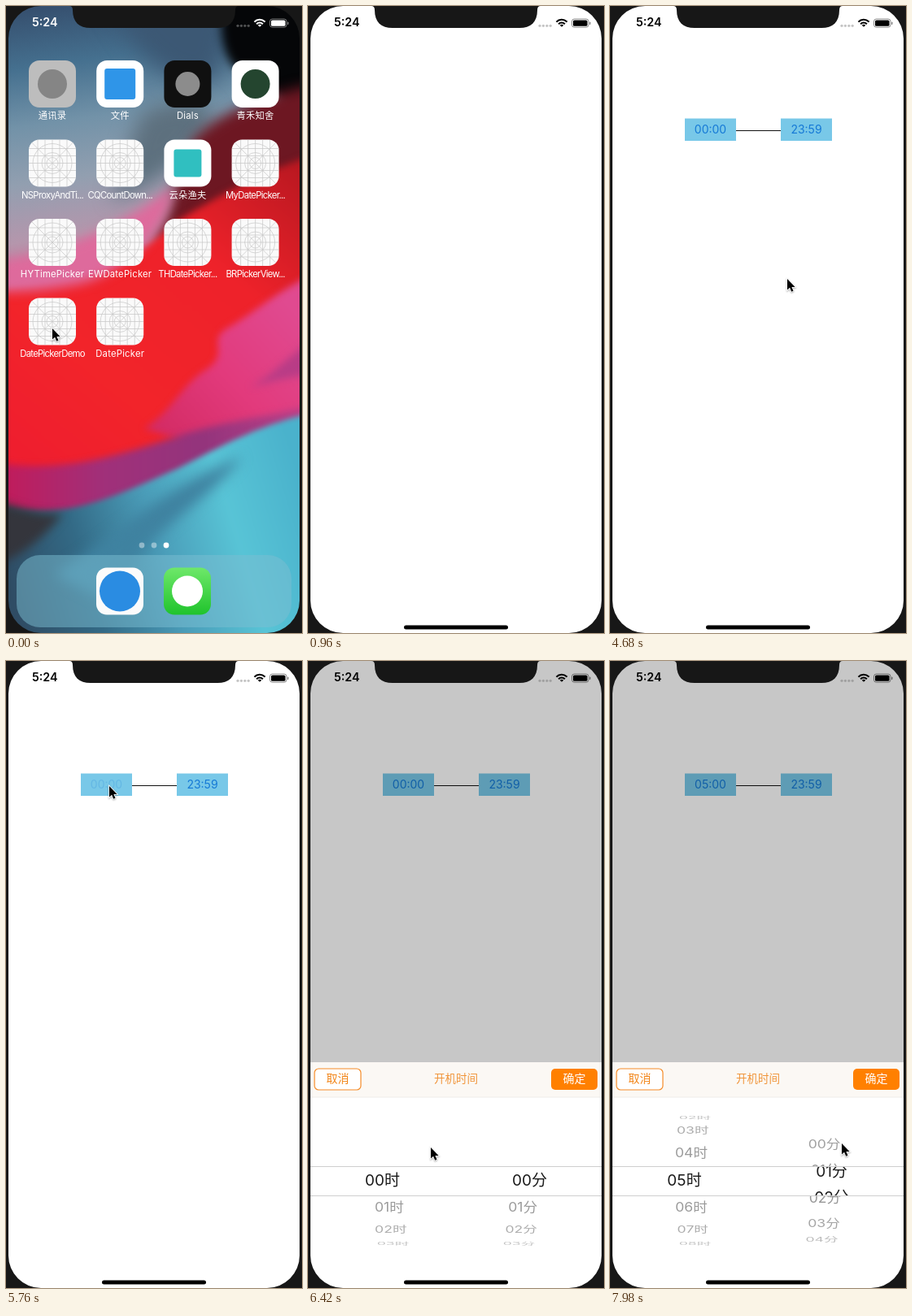
Write an HTML page with a canvas that moves like this. It is 364x772 px and loops after 8000 ms.

```html
<!DOCTYPE html>
<html lang="zh">
<head>
<meta charset="utf-8">
<style>
html, body { margin: 0; width: 364px; height: 772px; overflow: hidden; background: #171717; }
canvas { display: block; }
</style>
</head>
<body>
<canvas id="stage" width="364" height="772"></canvas>
<script>
const W = 364, H = 772, LOOP = 8000, STEP = 60;
const FONT = 'Inter, "Noto Sans CJK SC", "Noto Sans CJK", sans-serif';
const ctx = document.getElementById('stage').getContext('2d');

const clamp = v => Math.max(0, Math.min(1, v));
const lerp = (a, b, p) => a + (b - a) * p;
const span = (t, a, b) => clamp((t - a) / (b - a));
const smooth = p => p * p * (3 - 2 * p);
const easeOut = p => 1 - (1 - p) ** 3;
const spring = x => 1 - (1 + x) * Math.exp(-x);

// Keyed values: [time, ...numbers]
function track(keys, t, ease = smooth) {
  let i = 0;
  while (i < keys.length - 2 && t >= keys[i + 1][0]) i++;
  const a = keys[i], b = keys[i + 1], p = ease(span(t, a[0], b[0]));
  return a.slice(1).map((v, k) => lerp(v, b[k + 1], p));
}

function layer(paint) {
  const c = document.createElement('canvas');
  c.width = W;
  c.height = H;
  paint(c.getContext('2d'));
  return c;
}

function box(g, x, y, w, h, r, fill) {
  g.beginPath();
  g.roundRect(x, y, w, h, r);
  if (fill) { g.fillStyle = fill; g.fill(); }
}

function disc(g, x, y, r, fill) {
  g.beginPath();
  g.arc(x, y, r, 0, 7);
  g.fillStyle = fill;
  g.fill();
}

function text(g, s, x, y, size, fill, weight = 400, align = 'center', spacing = 0) {
  g.font = `${weight} ${size}px ${FONT}`;
  g.textAlign = align;
  g.textBaseline = 'middle';
  g.letterSpacing = spacing + 'px';
  g.fillStyle = fill;
  g.fillText(s, x, y);
  g.letterSpacing = '0px';
}

function line(g, x1, y1, x2, y2, stroke, width = 1) {
  g.beginPath();
  g.moveTo(x1, y1);
  g.lineTo(x2, y2);
  g.strokeStyle = stroke;
  g.lineWidth = width;
  g.stroke();
}

function gradient(g, x1, y1, x2, y2, colors) {
  const grad = g.createLinearGradient(x1, y1, x2, y2);
  colors.forEach((c, i) => grad.addColorStop(i / (colors.length - 1), c));
  return grad;
}

function paintWall(g) {
  g.fillStyle = gradient(g, 60, 0, 110, 350, ['#36506f', '#45708f', '#7292a8', '#929fb0', '#b596ac', '#d0628f']);
  g.fillRect(0, 0, W, H);
  const shape = (path, fill, blur) => {
    g.filter = `blur(${blur}px)`;
    g.fillStyle = fill;
    g.fill(new Path2D(path));
  };
  shape('M120 -20L290 -20L260 90C220 100 170 90 120 -20Z', '#3c5874', 14);
  shape('M170 130C220 110 260 110 250 150C210 200 180 220 130 240C150 190 150 160 170 130Z', '#5d707e', 12);
  shape('M268 -20L390 -20L390 150C340 130 325 95 295 85C270 75 258 40 268 -20Z', '#050608', 6);
  shape('M390 95C330 105 260 130 230 165C205 200 210 250 180 290L390 320Z', '#6d1722', 8);
  shape('M390 180C320 200 260 235 210 265C150 320 70 340 -20 345L-20 610L390 520Z',
    gradient(g, 0, 600, 364, 160, ['#ee1c30', '#f2242a', '#ee222a', '#b0161f']), 4);
  shape('M-20 315C60 305 130 280 205 222C205 260 160 320 100 340C60 350 20 352 -20 352Z', '#de6a9c', 7);
  shape('M390 325C340 345 310 375 275 395C245 410 275 425 250 445C215 465 205 500 170 520L230 540L390 510Z',
    gradient(g, 180, 530, 350, 370, ['#d22a62', '#e23a7c', '#e04a90']), 4);
  shape('M390 405C350 425 335 450 300 470C330 460 350 458 390 450Z', '#b83c86', 5);
  shape('M-20 560C60 580 150 550 210 530C270 510 320 508 390 488L390 540L-20 660Z',
    gradient(g, 0, 0, 364, 0, ['#c01c5c', '#a0307a', '#93347c', '#b84088']), 4);
  shape('M-20 612C70 640 140 600 210 570C270 540 310 515 390 498L390 800L-20 800Z',
    gradient(g, 0, 700, 364, 590, ['#2f4c64', '#336a86', '#4a9cb8', '#58c4d6', '#4ab2cc']), 3);
  shape('M-20 606C20 620 45 628 70 625C50 650 20 680 -20 690Z', '#34353c', 6);
  shape('M60 700C140 650 180 600 290 555C250 610 180 640 120 730Z', '#3f82a0', 8);
  g.filter = 'none';
}

function tile(g, x, y, fill) {
  box(g, x - 29, y - 29, 58, 58, 13, fill);
}

function blankIcon(g, x, y) {
  tile(g, x, y, '#fafafa');
  g.save();
  g.clip();
  const ink = '#c6c6c6', thin = 0.7;
  for (const d of [-18, -9, 0, 9, 18]) {
    line(g, x + d, y - 29, x + d, y + 29, ink, thin);
    line(g, x - 29, y + d, x + 29, y + d, ink, thin);
  }
  line(g, x - 29, y - 29, x + 29, y + 29, ink, thin);
  line(g, x - 29, y + 29, x + 29, y - 29, ink, thin);
  for (const r of [7, 13, 24]) {
    g.beginPath();
    g.arc(x, y, r, 0, 7);
    g.stroke();
  }
  g.restore();
}

function markIcon(g, x, y, back, mark, r, square) {
  tile(g, x, y, back);
  if (square) box(g, x - r, y - r, 2 * r, 2 * r, 3, mark);
  else disc(g, x, y, r, mark);
}

const apps = [
  ['通讯录', '#bdbdbd', '#858585', 18], ['文件', '#fff', '#2f95e8', 19, true],
  ['Dials', '#101010', '#8c8c8c', 15], ['青禾知舍', '#fff', '#24452f', 18],
  ['NSProxyAndTi...'], ['CQCountDown...'], ['云朵渔夫', '#fff', '#30bfc0', 17, true], ['MyDatePicker...'],
  ['HYTimePicker'], ['EWDatePicker'], ['THDatePicker...'], ['BRPickerView...'],
  ['DatePickerDemo'], ['DatePicker']
];

function paintIcons(g) {
  apps.forEach(([name, back, mark, r, square], i) => {
    const x = 57 + (i % 4) * 83.2, y = 96 + Math.floor(i / 4) * 97.5;
    if (back) markIcon(g, x, y, back, mark, r, square);
    else blankIcon(g, x, y);
    text(g, name, x, y + 40, 11.3, '#fff', 400, 'center', name.length > 12 ? -0.7 : 0.2);
  });
  for (let i = 0; i < 3; i++) disc(g, 167 + i * 15, 664, 3.4, i == 2 ? '#fff' : 'rgba(255,255,255,.42)');
  box(g, 13, 676, 338, 89, 29, 'rgba(125,190,210,.5)');
  markIcon(g, 140, 720.5, '#fbfbfb', '#2a8ce2', 25);
  markIcon(g, 223, 720.5, gradient(g, 0, 691, 0, 750, ['#6fe86a', '#1fc32c']), '#fff', 19);
}

const wall = layer(paintWall), icons = layer(paintIcons);

function statusBar(ink, dots) {
  text(ctx, '5:24', 32, 21, 14.3, ink, 600, 'left');
  for (let i = 0; i < 4; i++) disc(ctx, 285 + i * 4.4, 24.3, 1.6, dots);
  const arc = (r, w) => {
    ctx.beginPath();
    ctx.arc(312, 25.8, r, -Math.PI * 0.76, -Math.PI * 0.24);
    ctx.lineWidth = w;
    ctx.strokeStyle = ink;
    ctx.stroke();
  };
  arc(1.5, 3);
  arc(5.3, 2.1);
  arc(9, 2.1);
  ctx.save();
  ctx.globalAlpha *= 0.45;
  box(ctx, 324.5, 16, 20.5, 10.2, 3);
  ctx.lineWidth = 1;
  ctx.stroke();
  box(ctx, 346, 19.4, 1.5, 3.6, 1, ink);
  ctx.restore();
  box(ctx, 326, 17.4, 17.5, 7.4, 1.6, ink);
}

function home(p) {
  ctx.drawImage(wall, 0, 0);
  ctx.save();
  if (p > 0) {
    ctx.filter = `blur(${8 * p}px)`;
    ctx.drawImage(wall, 0, 0);
  }
  const k = 1 - 0.048 * p;
  ctx.globalAlpha = 1 - 0.2 * p;
  ctx.translate(182, 386);
  ctx.scale(k, k);
  ctx.drawImage(icons, -182, -386);
  ctx.restore();
  ctx.fillStyle = `rgba(0,0,0,${0.42 * p})`;
  ctx.fillRect(0, 0, W, H);
  ctx.save();
  ctx.globalAlpha = 1 - 0.72 * p;
  statusBar('#fff', 'rgba(255,255,255,.3)');
  ctx.restore();
}

function launch(t) {
  const s = Math.max(0, t - STEP) / 1000;
  const p = spring(11.5 * s), q = spring(9.8 * s);
  home(clamp(p * 1.15));
  if (t < STEP) return;
  const w = lerp(58, 358, p), h = lerp(58, 772, q);
  const x = lerp(57, 182, p) - w / 2, y = lerp(389, 386, q) - h / 2;
  const fade = clamp(p * 4);
  ctx.save();
  box(ctx, x, y, w, h, lerp(13, 48, p));
  ctx.clip();
  ctx.translate(x, y);
  ctx.scale(w / 358, w / 358);
  ctx.translate(-3, 0);
  ctx.globalAlpha = fade;
  ctx.fillStyle = '#fff';
  ctx.fillRect(0, 0, W, H * 2);
  statusBar('#000', '#c4c4c4');
  ctx.restore();
  if (fade < 1) {
    ctx.save();
    ctx.globalAlpha = 1 - fade;
    ctx.translate(x + w / 2, y + h / 2);
    ctx.scale(w / 58, w / 58);
    blankIcon(ctx, 0, 0);
    ctx.restore();
  }
}

function timeButton(x, label, alpha) {
  ctx.fillStyle = '#78c8e8';
  ctx.fillRect(x, 138.5, 63, 27.5);
  ctx.save();
  ctx.globalAlpha *= alpha;
  text(ctx, label, x + 31.5, 153, 14, '#1579d6');
  ctx.restore();
}

function wheel(side, s, unit) {
  const mid = 640, top = 622.5, bottom = 658.5;
  const drum = () => {
    for (let i = Math.max(0, Math.ceil(s - 3.5)); i <= s + 3.5; i++) {
      const a = (i - s) * 24.5 * Math.PI / 180, c = Math.cos(a);
      ctx.save();
      ctx.translate(182 + side * (75.5 + 7.2 * c), mid + 80.8 * Math.sin(a));
      ctx.scale(1, c);
      text(ctx, label(i), 0, 0, 17.6, `rgba(0,0,0,${0.16 + 0.26 * c})`);
      ctx.restore();
    }
  };
  const lens = () => {
    for (let i = Math.floor(s); i <= s + 1; i++) {
      text(ctx, label(i), 182 + side * 90.5, mid + (i - s) * 32, 19, '#1a1a1a');
    }
  };
  const label = i => String(i).padStart(2, '0') + unit;
  const band = (y, end, draw) => {
    ctx.save();
    ctx.beginPath();
    ctx.rect(0, y, W, end - y);
    ctx.clip();
    draw();
    ctx.restore();
  };
  band(537, top, drum);
  band(bottom, H, drum);
  band(top, bottom, lens);
}

function sheet(t) {
  const p = easeOut(span(t, 5860, 6240));
  if (!p) return;
  ctx.fillStyle = `rgba(0,0,0,${0.22 * p})`;
  ctx.fillRect(0, 0, W, H);
  ctx.save();
  ctx.translate(0, 278 * (1 - p));
  ctx.fillStyle = '#fff';
  ctx.fillRect(0, 494, W, 278);
  ctx.fillStyle = '#fbf8f4';
  ctx.fillRect(0, 494, W, 43);
  line(ctx, 0, 537, W, 537, '#eeebe8');
  box(ctx, 8, 502, 57, 26, 5, '#fff');
  ctx.strokeStyle = '#f58c28';
  ctx.lineWidth = 1.2;
  ctx.stroke();
  text(ctx, '取消', 36.5, 515, 14, '#f28518');
  text(ctx, '开机时间', 182, 515, 13.5, '#f09438');
  box(ctx, 299, 502, 57, 26, 5, '#ff8000');
  text(ctx, '确定', 327.5, 515, 14, '#fff');
  const hour = track([[6600, 0], [7020, 3.3], [7440, 5]], t, x => x * (1.5 - 0.5 * x))[0];
  const minute = track([[7680, 0], [7980, 1.345]], t)[0];
  wheel(-1, hour, '时');
  wheel(1, minute, '分');
  line(ctx, 0, 622.5, W, 622.5, '#cfcfcf');
  line(ctx, 0, 658.5, W, 658.5, '#cfcfcf');
  ctx.restore();
}

function app(t) {
  ctx.fillStyle = '#fff';
  ctx.fillRect(0, 0, W, H);
  if (t >= 4560) {
    ctx.save();
    ctx.globalAlpha = span(t, 4500, 4680);
    line(ctx, 155, 153.5, 210, 153.5, '#111', 1.2);
    timeButton(92, t < 7500 ? '00:00' : '05:00', t >= 5700 && t < 5880 ? 0.2 : 1);
    timeButton(210, '23:59', 1);
    ctx.restore();
  }
  sheet(t);
  statusBar('#000', t < 5900 ? '#c4c4c4' : '#a0a0a0');
  box(ctx, 118, 762.5, 128, 5, 2.5, '#000');
}

function bezel() {
  ctx.fillStyle = '#171717';
  ctx.beginPath();
  ctx.rect(0, 0, W, H);
  ctx.roundRect(3, 0, 358, H, 40);
  ctx.fill('evenodd');
  ctx.fill(new Path2D('M78 0Q82 0 82 5C82 20 90 27 104 27L260 27C274 27 282 20 282 5Q282 0 286 0Z'));
}

const path = [
  [0, 57, 397], [1380, 57, 397], [1860, 214, 343], [2460, 214, 343], [2580, 217, 339],
  [3360, 217, 339], [3420, 218, 336], [5160, 218, 336], [5640, 127, 154], [5940, 127, 154],
  [6420, 151, 599], [6600, 108, 690], [7020, 104, 575], [7200, 104, 575],
  [7620, 287, 642], [7680, 287, 642], [7980, 285, 594]
];
const arrow = new Path2D('M0 0L0 13.6L3.1 10.8L5.2 15.7L7.5 14.7L5.4 9.9L9.6 9.9Z');

function pointer(t) {
  if (t >= 960 && t < 1380) return;
  const [x, y] = track(path, t);
  ctx.save();
  ctx.translate(x, y);
  ctx.shadowColor = 'rgba(0,0,0,.35)';
  ctx.shadowBlur = 2;
  ctx.shadowOffsetY = 1;
  ctx.lineWidth = 1.6;
  ctx.strokeStyle = '#fff';
  ctx.stroke(arrow);
  ctx.shadowColor = 'transparent';
  ctx.fillStyle = '#000';
  ctx.fill(arrow);
  ctx.restore();
}

const start = performance.now();

function frame() {
  const now = (performance.now() - start) % LOOP;
  const t = Math.floor(now / STEP) * STEP;
  ctx.clearRect(0, 0, W, H);
  if (t < 780) launch(t);
  else app(t);
  bezel();
  pointer(t);
  requestAnimationFrame(frame);
}
frame();
</script>
</body>
</html>
```
